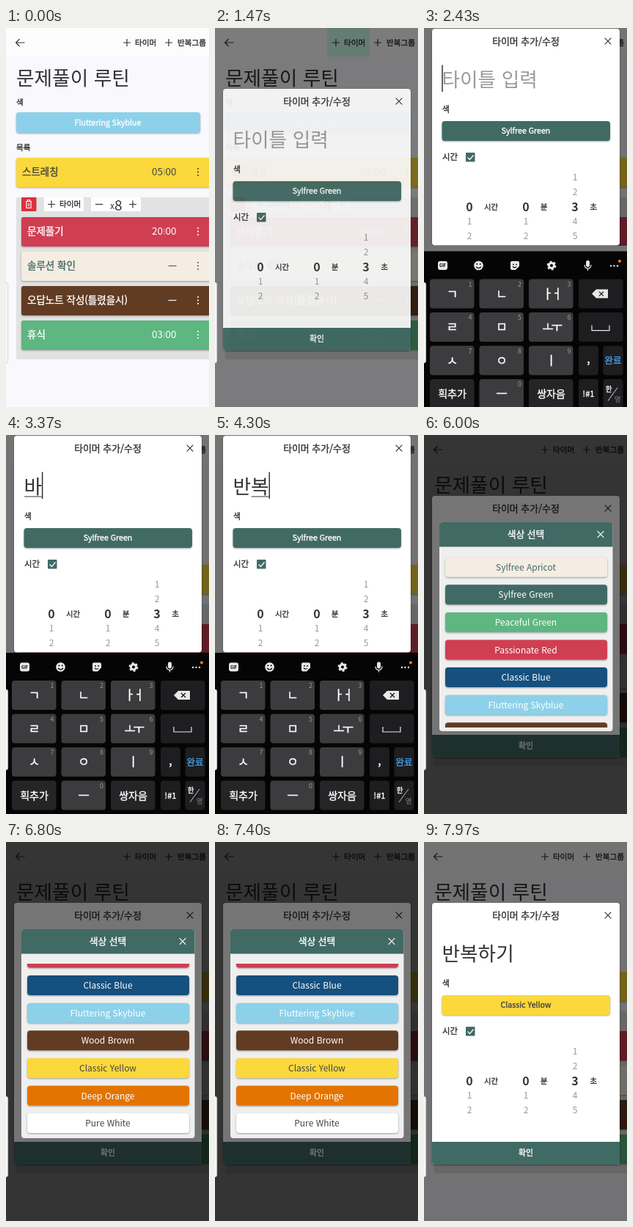
Write an HTML page that moves like this. It is 277 px wide and 517 px high and loops after 8000 ms.

```html
<!DOCTYPE html>
<html lang="ko">
<head>
<meta charset="utf-8">
<style>
html, body { margin: 0; width: 100%; height: 100%; overflow: hidden; background: #737375; }
svg { display: block; width: 277px; height: 517px; }
text { font-family: "Noto Sans CJK KR", "Noto Sans CJK", "Noto Sans CJK JP", sans-serif; white-space: pre; stroke-width: 0; }
.medium { stroke-width: .35px; }
.raised { filter: drop-shadow(0 1px 1px rgba(0,0,0,.35)); }
.line { fill: none; stroke-width: 1.2; }
</style>
</head>
<body>
<svg id="stage" viewBox="0 0 277 517"></svg>
<script>
const TEAL = '#416a65', INK = '#333', DIM = 0.54, LOOP = 8000, FOLD = 297;

// Drawing helpers; text is centred vertically on y
const rect = (x, y, w, h, fill, r = 0, more = '') =>
  `<rect x="${x}" y="${y}" width="${w}" height="${h}" rx="${r}" fill="${fill}" ${more}/>`;
const text = (x, y, s, size, fill = INK, more = '') =>
  `<text x="${x}" y="${y + size * 0.37}" font-size="${size}" fill="${fill}" stroke="${fill}" ${more}>${s}</text>`;
const mid = (x, y, s, size, fill, more = '') =>
  text(x, y, s, size, fill, 'text-anchor="middle" ' + more);
const line = (d, stroke = INK, more = '') => `<path class="line" d="${d}" stroke="${stroke}" ${more}/>`;
const dot = (x, y, r, fill) => `<circle cx="${x}" cy="${y}" r="${r}" fill="${fill}"/>`;
const minus = (x, y, r = 5, c = INK) => line(`M${x - r} ${y}h${2 * r}`, c);
const plus = (x, y, r = 5) => line(`M${x - r} ${y}h${2 * r}M${x} ${y - r}v${2 * r}`);
const cross = (x, y, c) => line(`M${x - 4.3} ${y - 4.3}l8.6 8.6m0-8.6l-8.6 8.6`, c);
const raised = s => `<g class="raised">${s}</g>`;
const LIGHT = 'font-weight="300"', MEDIUM = 'class="medium"', BOLD = 'font-weight="700"';

const colors = [
  ['Sylfree Apricot', '#f6ede2', TEAL],
  ['Sylfree Green', TEAL, '#fff'],
  ['Peaceful Green', '#5eb681', '#fff'],
  ['Passionate Red', '#d03e52', '#fff'],
  ['Classic Blue', '#15507e', '#fff'],
  ['Fluttering Skyblue', '#8cd1e9', '#fff'],
  ['Wood Brown', '#623c22', '#fff'],
  ['Classic Yellow', '#fbd83b', '#444'],
  ['Deep Orange', '#e37400', '#fff'],
  ['Pure White', '#fff', '#444']
];

function row(x, y, color, title, time) {
  const [, bg, fg] = colors[color], cy = y + 19.5;
  const clock = time
    ? text(199, cy, time, 13.5, fg) + text(217.5, cy, '00', 13.5, fg) +
      line(`M216 ${cy - 4}v9`, fg, 'opacity=".6" stroke-dasharray="2 1"')
    : minus(227, cy, 5.5, fg);
  return raised(rect(x, y, 290, 40, bg, 3)) + text(x + 8, cy, title, 13.5, fg, MEDIUM) + clock +
    [-4.5, 0, 4.5].map(d => dot(262, cy + d, 1.1, fg)).join('');
}

function page() {
  const trash = line('M27 236.500h8M29.500 236v-1.500h3v1.500M28 237v8.500h6v-8.500M31 239v4.500', '#fff');
  return rect(0, 0, 277, 517, '#f9f8fc') + rect(0, 0, 277, 39, '#fcfcfd') +
    rect(153, 0, 58, 39, '#cdfbe9', 0, 'id="tap"') +
    line('M25.500 20h-12M18.500 15l-5 5l5 5') +
    plus(165, 20) + text(176, 20, '타이머', 10.6, INK, MEDIUM) +
    plus(222, 20) + text(234, 20, '반복그룹', 10.6, INK, MEDIUM) +
    text(14, 68, '문제풀이 루틴', 26.7, INK, LIGHT) + text(14, 101, '색', 10.6, INK, MEDIUM) +
    raised(rect(14, 115, 251, 28, colors[5][1], 4)) +
    mid(139, 129, 'Fluttering Skyblue', 10.6, '#fff', MEDIUM) +
    text(14, 163, '목록', 10.6, INK, MEDIUM) + row(14, 177, 7, '스트레칭', '05') +
    rect(14, 231, 270, 221, '#e2e2e2', 2) +
    rect(21, 231, 20.5, 19, '#d9323c', 1) + trash +
    rect(52, 231, 54, 19, '#fff', 1) + plus(62, 240.5) + text(73, 240.5, '타이머', 10.6, INK, MEDIUM) +
    rect(116, 231, 68, 19, '#fff', 1) + minus(127, 240.5) + plus(173, 240.5) +
    text(142, 243, 'x', 12) + text(148, 242, '8', 19) +
    row(21, 258, 3, '문제풀기', '20') + row(21, 305, 0, '솔루션 확인') +
    row(21, 352, 6, '오답노트 작성(틀렸을시)') + row(21, 399, 2, '휴식', '03');
}

function wheel(x, value, label, lx) {
  let s = mid(x, 326, value, 16, INK, BOLD) + text(lx, 326, label, 10.3, INK, MEDIUM);
  for (let d = -2; d < 3; d++)
    if (d && value + d >= (value ? 1 : 0)) s += mid(x, 326 + 20 * d, value + d, 12, '#999');
  return s;
}

function timerDialog() {
  return raised(rect(11, 83, 256, 357, '#fff', 4, 'id="timerBox"')) +
    mid(139, 100, '타이머 추가/수정', 12.9, INK, MEDIUM) + cross(251, 100) +
    text(24.5, 152.5, '', 26.7, INK, 'id="entry" ' + LIGHT) +
    '<path id="under" stroke="#333" stroke-width="1"/><path id="caret" stroke="#222" stroke-width="1.4"/>' +
    text(25, 193, '색', 10.8, INK, MEDIUM) +
    raised(rect(24.5, 209, 229.5, 27, TEAL, 4, 'id="pick"')) +
    mid(139, 222.5, '', 10.6, '#fff', 'id="pickName" ' + MEDIUM) +
    text(25, 258, '시간', 11.4, INK, MEDIUM) + rect(57, 252, 12.5, 12.5, TEAL, 1) +
    line('M59.500 258.500l3 3l5-6', '#fff') +
    wheel(62, 0, '시간', 82) + wheel(139, 0, '분', 159) + wheel(206, 3, '초', 226.5) +
    `<path d="M11 409h256v27q0 4-4 4h-248q-4 0-4-4z" fill="${TEAL}"/>` +
    mid(139, 424.5, '확인', 10.8, '#fff', MEDIUM);
}

function colorDialog() {
  const items = colors.map(([name, bg, fg], i) => {
    const y = 166.7 + i * 37.6;
    return raised(rect(29, y, 221, 27, bg, 4)) + mid(139, y + 13.7, name, 12, fg);
  }).join('');
  return rect(21, 119, 236.5, 285, '#efefef', 4) +
    `<path d="M21 152.500v-29.500q0-4 4-4h228.500q4 0 4 4v29.500z" fill="${TEAL}"/>` +
    mid(139, 135.5, '색상 선택', 12.8, '#fff', MEDIUM) + cross(241, 135.5, '#fff') +
    `<g clip-path="url(#listClip)"><g id="list">${items}</g></g>`;
}

const cols = [8, 75.5, 143], tops = [335, 380.5, 426, 471.5];
const keyNames = ['ㄱ', 'ㄴ', 'ㅏㅓ', 'ㄹ', 'ㅁ', 'ㅗㅜ', 'ㅅ', 'ㅇ', 'ㅣ', '획추가', 'ㅡ', '쌍자음'];
const keyFill = name => name.length > 2 ? '#252527' : '#3c3c3f';

function keyboard() {
  const light = '#e8e8e8', dark = '#1e1e20';
  let s = rect(0, FOLD, 277, 230, '#050506');
  s += rect(19, 310.5, 13, 12, light, 3) + mid(25.5, 316.5, 'GIF', 5.5, '#000', BOLD);
  s += dot(74.5, 316.5, 6.3, light) + dot(72.3, 314.5, 1, '#000') + dot(76.7, 314.5, 1, '#000') +
    line('M71 318q3.500 4 7 0', '#000');
  s += `<path d="M120 310.500h8q2 0 2 2v5l-5 5h-5q-2 0-2-2v-8q0-2 2-2z" fill="${light}"/>` +
    dot(122, 315, 0.9, '#000') + dot(126, 315, 0.9, '#000') + line('M121 318q3 2.500 5 0', '#000');
  s += dot(174, 316.5, 5, light) + dot(174, 316.5, 2, '#000') +
    `<circle cx="174" cy="316.5" r="5.2" fill="none" stroke="${light}" stroke-width="2.4" stroke-dasharray="2.7"/>`;
  s += rect(221, 309.5, 5, 9, light, 2.5) + line('M219 315.500q0 5 4.500 5t4.500-5M223.500 320.500v3', light);
  s += [255, 259.5, 264].map(x => dot(x, 317, 1.2, light)).join('') + dot(267, 310.5, 2, '#f58220');
  keyNames.forEach((name, i) => {
    const x = cols[i % 3], y = tops[i / 3 | 0], word = name.length > 2;
    s += rect(x, y, 60.5, 40, keyFill(name), 4, `id="key${i}"`);
    s += mid(x + 30.5, y + 20, name, word ? 14 : 17, '#fff',
      MEDIUM + (name.length == 2 ? ' letter-spacing="-3.5"' : ''));
    if (!word) s += mid(x + 55, y + 7, i == 10 ? 0 : i + 1, 9, '#999');
  });
  s += rect(211, tops[0], 60.5, 40, dark, 4) + rect(211, tops[1], 60.5, 40, dark, 4);
  for (const x of [211, 244.5])
    for (const y of tops.slice(2)) s += rect(x, y, 27, 40, dark, 4);
  s += `<path d="M229 355l6-6h16v12h-16z" fill="${light}"/>` + line('M239 352l6 6m0-6l-6 6', '#111');
  s += line('M229 398v7h24v-7', light);
  s += mid(224.5, 444, ',', 16, '#fff', MEDIUM) + mid(258, 446, '완료', 12.5, '#43a0ec', MEDIUM);
  s += mid(224.5, 491.5, '!#1', 11, '#fff', MEDIUM) + mid(252, 484.5, '한', 9.5, '#fff', MEDIUM) +
    mid(264, 499, '영', 9.5, '#888') + line('M251 501l13-18', '#999');
  return s;
}

const $ = id => document.getElementById(id);
$('stage').innerHTML = `<defs>
  <clipPath id="appClip"><rect id="appBox" width="277" height="517"/></clipPath>
  <clipPath id="listClip"><rect x="21" y="166" width="237" height="233"/></clipPath></defs>
  <g clip-path="url(#appClip)">${page()}
    ${rect(0, 0, 277, 517, '#000', 0, 'id="veil1"')}<g id="timer">${timerDialog()}</g>
    ${rect(0, 0, 277, 517, '#000', 0, 'id="veil2"')}<g id="chooser">${colorDialog()}</g></g>
  <g id="keys">${keyboard()}</g>
  ${rect(-4, 347, 6.7, 110, '#f6f6f6', 3, 'stroke="#bbb" stroke-width=".5"')}`;

// [time, key index, text after the press]
const presses = [
  [2900, 4, 'ㅁ'], [3060, 9, 'ㅂ'], [3230, 2, '바'], [3400, 1, '반'],
  [3560, 4, '반ㅁ'], [3750, 9, '반ㅂ'], [3920, 5, '반보'], [4090, 0, '반복'],
  [4330, 7, '반복ㅇ'], [4450, 9, '반복ㅎ'], [4620, 2, '반복하'], [4780, 0, '반복학'], [4930, 8, '반복하기']
];

const ramp = (t, a, b) => Math.min(1, Math.max(0, (t - a) / (b - a)));
const smooth = p => p * p * (3 - 2 * p);
const set = (id, name, value) => $(id).setAttribute(name, value);

function draw(t) {
  const folded = t >= 2080 && t < 5720;
  const shown = ramp(t, 1380, 1477);
  const choosing = ramp(t, 5530, 5645) * (1 - ramp(t, 7770, 7930));
  const rise = (1 - ramp(t, 2300, 2530)) ** 4 + ramp(t, 5720, 5960) ** 2;

  set('appBox', 'height', folded ? FOLD : 517);
  set('tap', 'opacity', ramp(t, 1330, 1400) * (1 - ramp(t, 1600, 2100)));
  set('veil1', 'opacity', DIM * shown);
  set('timer', 'opacity', shown ** 1.6);
  set('timer', 'transform', `translate(0 ${folded ? -82 : 0})`);
  set('timerBox', 'height', folded ? FOLD - 1.5 : 357);
  set('veil2', 'opacity', DIM * choosing);
  set('chooser', 'opacity', choosing ** 1.6);
  set('list', 'transform', `translate(0 ${-135 * smooth(ramp(t, 6030, 6780))})`);
  set('keys', 'transform', `translate(0 ${220 * rise})`);

  let typed = '';
  keyNames.forEach((name, i) => set('key' + i, 'fill', keyFill(name)));
  for (const [at, key, value] of presses) {
    if (t < at) break;
    typed = value;
    if (t < at + 110) set('key' + key, 'fill', '#6a6a6e');
  }
  $('entry').textContent = typed || '타이틀 입력';
  set('entry', 'fill', typed ? INK : '#9a9a9a');
  const focus = t >= 2300 && t < 5200, end = 25 + typed.length * 24.6;
  set('caret', 'd', focus ? `M${end} 132.5v36.5` : '');
  set('under', 'd', focus && typed ? `M${end - 24.5} 166h23.5` : '');

  const [name, bg, fg] = colors[t < 7770 ? 1 : 7];
  set('pick', 'fill', bg);
  set('pickName', 'fill', fg);
  set('pickName', 'stroke', fg);
  $('pickName').textContent = name;
}

function tick() {
  draw(performance.now() % LOOP);
  requestAnimationFrame(tick);
}
tick();
</script>
</body>
</html>
```
